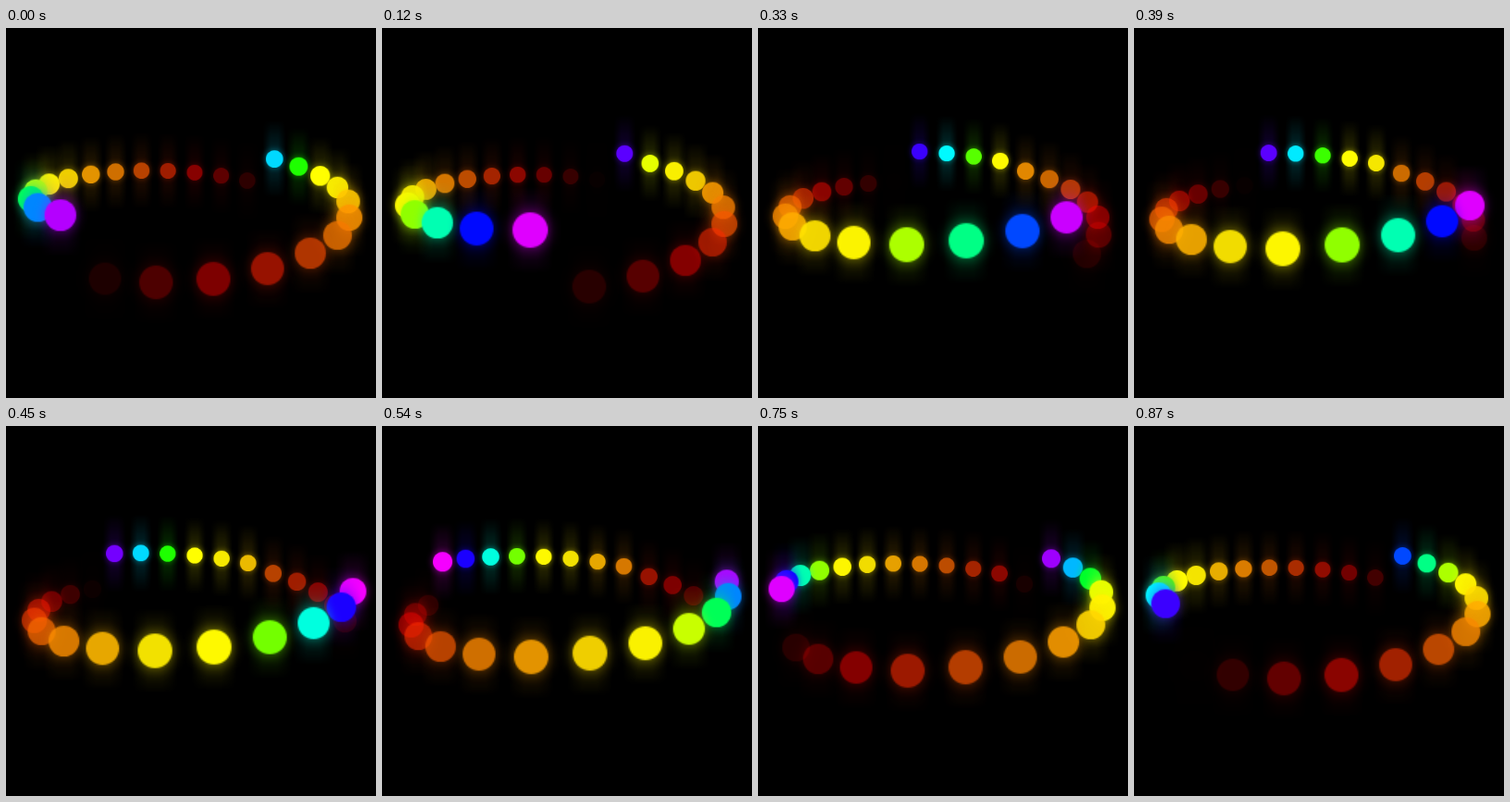
These frames come from a looping animation (400 px wide and 400 px high, 900 ms). An HTML page without scripts:

```html
<!DOCTYPE html>
<html lang="en">
<head>
<meta charset="utf-8">
<title>Rainbow ring</title>
<style>
  html, body { margin: 0; width: 100%; height: 100%; overflow: hidden; background: #000; }

  .stage {
    position: relative;
    width: 400px;
    height: 400px;
    overflow: hidden;
    perspective: 400px;
    perspective-origin: 200px 201px;
  }

  .ring {
    --tilt: 19.5deg;
    position: absolute;
    left: 200px;
    top: 201px;
    transform-style: preserve-3d;
    transform: rotateX(calc(-1 * var(--tilt)));
  }

  /* Each ball keeps its place on the ring and always faces the viewer. */
  .ring i {
    --angle: calc(var(--i) * 14.4deg - 37.8deg);
    --reach: calc(42px - 14px * cos(var(--angle)));
    position: absolute;
    width: 23px;
    height: 23px;
    margin: -11.5px;
    transform: rotateY(var(--angle)) translateZ(156px)
      rotateY(calc(-1 * var(--angle))) rotateX(var(--tilt));
    animation: fall .9s linear infinite, hue .9s linear infinite, fade .9s linear infinite;
    animation-delay: calc(var(--i) * 67.5ms - 925ms);
  }

  i::before, i::after { content: ""; position: absolute; }

  /* Tall faint glow */
  i::before {
    inset: calc(11.5px - var(--reach)) -4px;
    background: linear-gradient(transparent, currentColor, transparent);
    -webkit-mask: linear-gradient(90deg, transparent, #000 35%, #000 65%, transparent);
    mask: linear-gradient(90deg, transparent, #000 35%, #000 65%, transparent);
    opacity: .2;
  }

  i::after {
    inset: 0;
    border-radius: 50%;
    background: currentColor;
    box-shadow: 0 0 9px color-mix(in srgb, currentColor 45%, transparent);
  }

  @keyframes fall {
    from { translate: 0 -44.5px; }
    to { translate: 0 0; }
  }

  @keyframes hue {
    0% { color: #f0f; }
    6% { color: #6400ff; }
    8.6% { color: #00f; }
    11% { color: #00b4ff; }
    14.8% { color: #0ff; }
    19.5% { color: #0f0; }
    27% { color: #ff0; }
    38% { color: #fe0; }
    50% { color: #ff9600; }
    56% { color: #f58200; }
    78%, 100% { color: #f00; }
  }

  @keyframes fade {
    0%, 30% { opacity: 1; }
    55% { opacity: .85; }
    80% { opacity: .5; }
    100% { opacity: 0; }
  }
</style>
</head>
<body>
<div class="stage">
  <div class="ring">
    <i style="--i:-12"></i><i style="--i:-11"></i><i style="--i:-10"></i><i style="--i:-9"></i><i style="--i:-8"></i>
    <i style="--i:-7"></i><i style="--i:-6"></i><i style="--i:-5"></i><i style="--i:-4"></i><i style="--i:-3"></i>
    <i style="--i:-2"></i><i style="--i:-1"></i><i style="--i:0"></i><i style="--i:1"></i><i style="--i:2"></i>
    <i style="--i:3"></i><i style="--i:4"></i><i style="--i:5"></i><i style="--i:6"></i><i style="--i:7"></i>
    <i style="--i:8"></i><i style="--i:9"></i><i style="--i:10"></i><i style="--i:11"></i><i style="--i:12"></i>
  </div>
</div>
</body>
</html>
```
